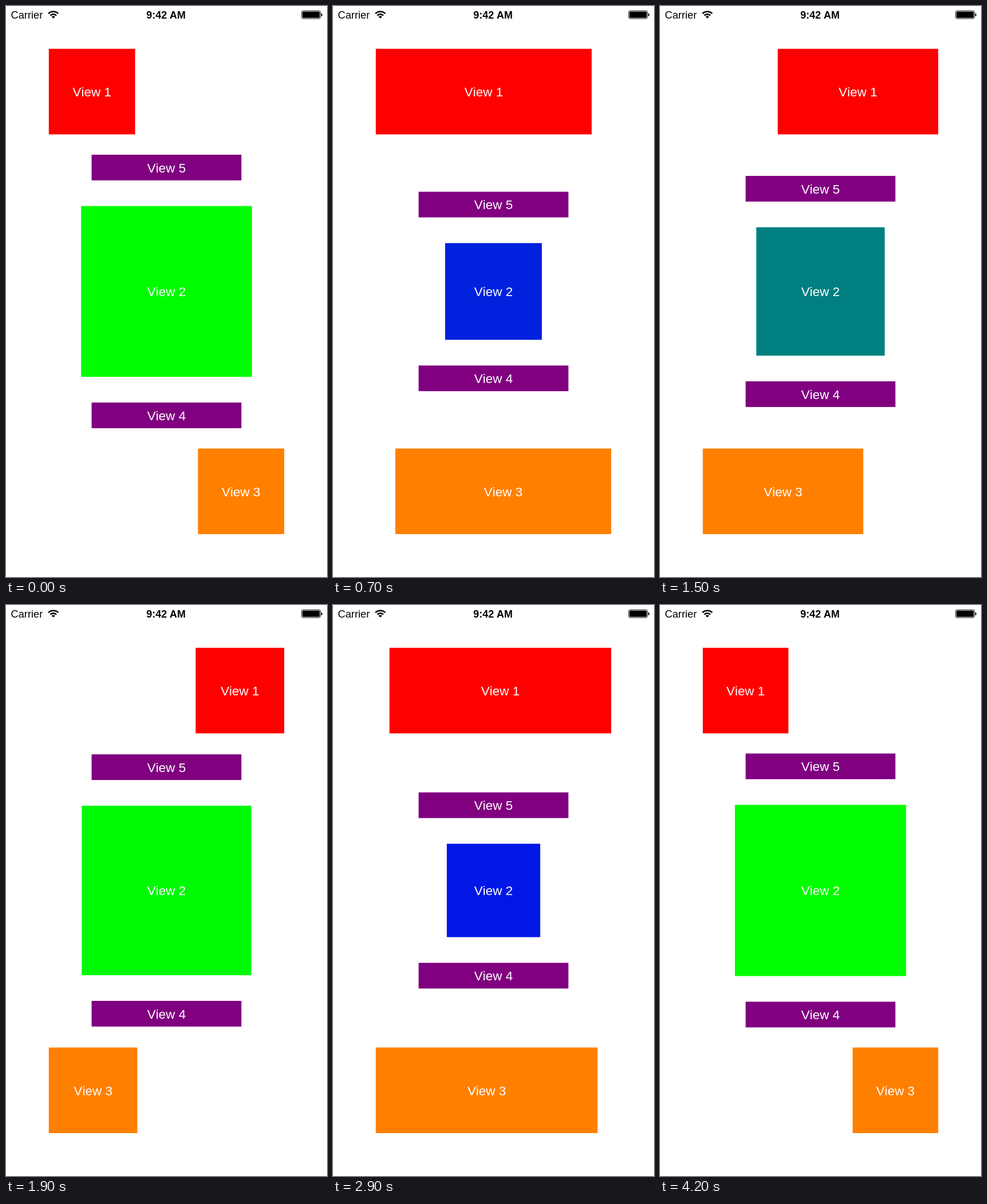
An HTML page with a canvas that plays this animation: 561x998 px, repeating every 4300 ms.

```html
<!DOCTYPE html>
<html lang="en">
<head>
<meta charset="utf-8">
<title>Auto layout views</title>
<style>
  html, body { margin: 0; width: 100%; height: 100%; overflow: hidden; background: #fff; }
  canvas { display: block; }
</style>
</head>
<body>
<canvas id="stage" width="561" height="998"></canvas>
<script>
const ctx = document.getElementById('stage').getContext('2d');
const LOOP = 4300, STEP = 100;
const W = 375, H = 667, MARGIN = 50, SCALE = 561 / W;
const FONT = '"Liberation Sans", Arial, sans-serif';

// Each phase lasts one second; "grow" widens views 1 and 3, "left" pins view 1 left.
const phases = [
  { start: -49, grow: true, left: true },
  { start: 1000, grow: false, left: false },
  { start: 2111, grow: true, left: false },
  { start: 3188, grow: false, left: true }
];

const clamp = x => Math.min(1, Math.max(0, x));
const mix = (a, b, p) => a + (b - a) * p;

// cubic-bezier(.42, 0, .58, 1)
function easeInOut(x) {
  let lo = 0, hi = 1, u = 0.5;
  for (let i = 0; i < 24; i++) {
    const v = 1 - u;
    if (1.26 * u * v * v + 1.74 * u * u * v + u * u * u < x) lo = u; else hi = u;
    u = (lo + hi) / 2;
  }
  return u * u * (3 - 2 * u);
}

function text(str, x, y, size, align, weight = '') {
  ctx.font = `${weight} ${size}px ${FONT}`;
  ctx.fontKerning = 'none';
  ctx.textAlign = align;
  ctx.fillText(str, x, y);
}

function view(n, color, x, y, w, h) {
  ctx.fillStyle = color;
  ctx.fillRect(x, y, w, h);
  ctx.fillStyle = '#fff';
  text('View ' + n, x + w / 2, y + h / 2 + 5.6, 15, 'center');
}

function roundBox(x, y, w, h, r) {
  ctx.beginPath();
  ctx.roundRect(x, y, w, h, r);
}

function statusBar() {
  ctx.fillStyle = ctx.strokeStyle = '#000';
  text('Carrier', 5.7, 14.5, 12.2, 'left');
  text('9:42 AM', 186.9, 14.5, 12, 'center', 'bold');

  // Wi-Fi
  const cx = 55.3, cy = 14.6, a = -Math.PI * 0.75, b = -Math.PI * 0.25;
  ctx.beginPath();
  ctx.moveTo(cx, cy);
  ctx.arc(cx, cy, 2.9, a, b);
  ctx.fill();
  ctx.lineWidth = 1.7;
  for (const r of [5, 8.1]) {
    ctx.beginPath();
    ctx.arc(cx, cy, r, a, b);
    ctx.stroke();
  }

  // Battery
  ctx.lineWidth = 0.6;
  roundBox(345.3, 5.6, 22.1, 9.2, 1.8);
  ctx.stroke();
  roundBox(346.2, 6.5, 20.3, 7.4, 1.1);
  ctx.fill();
  roundBox(368.2, 8.5, 1.3, 3.5, [0, 1.2, 1.2, 0]);
  ctx.fill();
}

function draw(t) {
  const phase = phases.filter(p => p.start <= t).pop();
  const e = easeInOut(clamp((t - phase.start) / 1000));
  const p = phase.grow ? e : 1 - e;

  ctx.setTransform(SCALE, 0, 0, SCALE, 0, 0);
  ctx.fillStyle = '#fff';
  ctx.fillRect(0, 0, W, H);
  statusBar();

  const wide = mix(100, W - 2 * MARGIN, p);
  const far = W - MARGIN - wide;
  view(1, '#f00', phase.left ? MARGIN : far, MARGIN, wide, 100);
  view(3, '#ff8000', phase.left ? far : MARGIN, H - MARGIN - 100, wide, 100);

  const side = mix(200, 100, p);
  const top = (H - side) / 2;
  const blue = Math.round(255 * p);
  view(2, `rgb(0, ${255 - blue}, ${blue})`, (W - side) / 2, top, side, side);
  view(5, '#800080', 100, top - 60, 175, 30);
  view(4, '#800080', 100, top + side + 30, 175, 30);
}

const origin = performance.now();
function tick() {
  const t = (performance.now() - origin) % LOOP;
  draw(Math.floor(t / STEP) * STEP);
  requestAnimationFrame(tick);
}
tick();
</script>
</body>
</html>
```
